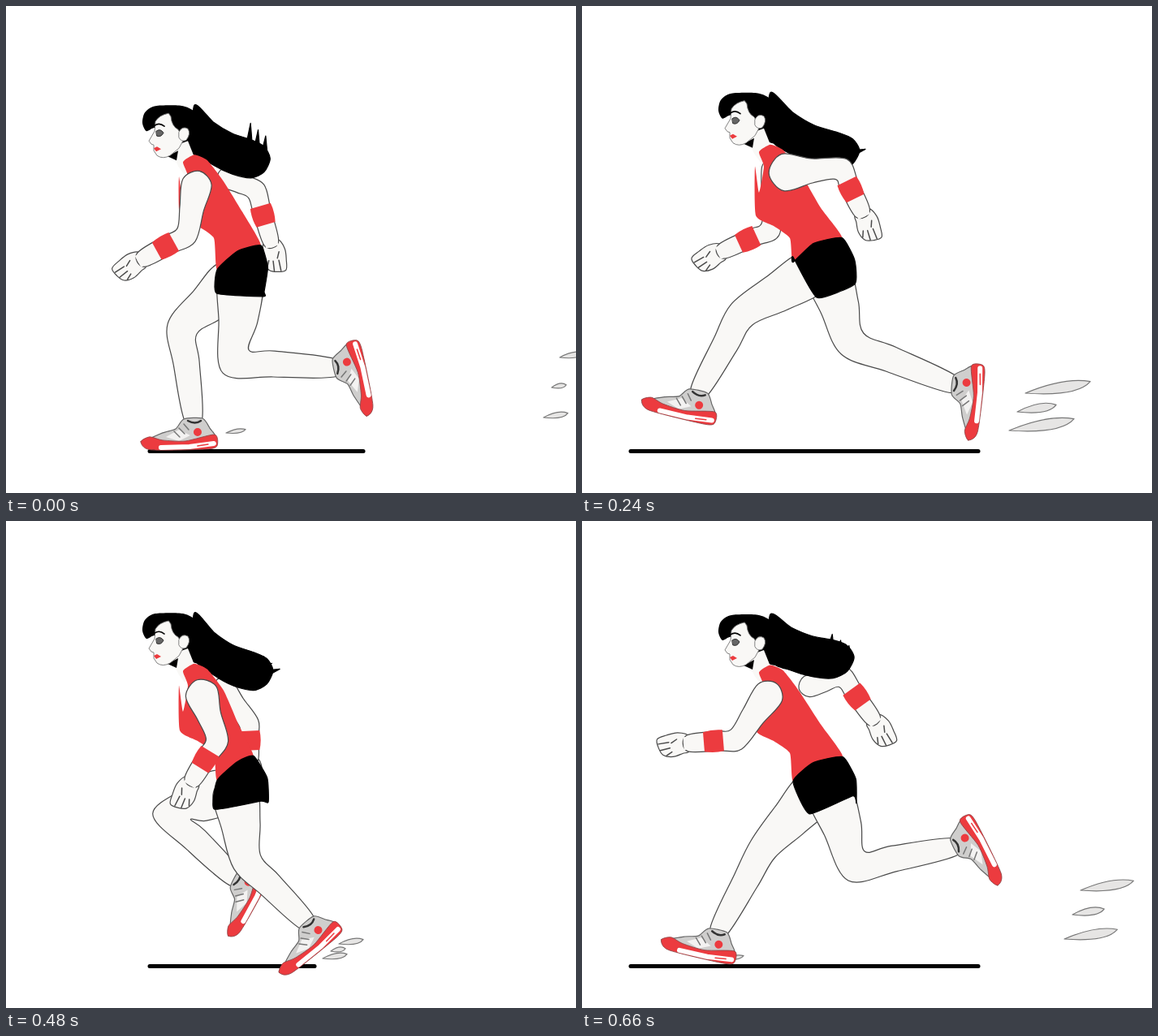
These frames come from a looping animation (702x600 px, 720 ms). An HTML page:

```html
<!DOCTYPE html>
<html lang="en">
<head>
<meta charset="utf-8">
<title>Runner</title>
<style>
html, body { margin: 0; width: 100%; height: 100%; overflow: hidden; background: #fff; }
svg { display: block; width: 702px; height: 600px; }
</style>
</head>
<body>
<svg id="stage" viewBox="0 0 702 600"></svg>
<script>
const SKIN = '#f9f8f6', RED = '#ec3b3f', INK = '#000', LINE = '#4a4a4a';
const STEP = 60, CYCLE = 12, HALF = 6;

// Key points of one stride: phase, then two joints. The far limb runs half a cycle later.
const legKeys = [ // knee, ankle
  [0, 283, 438, 407, 446], [2, 204, 364, 284, 442], [3, 198, 352, 231, 453],
  [4, 197, 380, 143, 477], [5, 223, 404, 167, 507], [6, 217, 398, 231, 511],
  [8, 297, 420, 372, 496], [9, 382, 423, 456, 484], [10, 333, 416, 459, 467],
  [11, 338, 425, 461, 401]];
const armKeys = [ // elbow, wrist
  [0, 222, 282, 166, 313], [2, 299, 249, 301, 296], [4, 319, 201, 346, 256],
  [5, 321, 192, 360, 246], [6, 308, 228, 327, 293], [8, 260, 270, 228, 322],
  [10, 232, 275, 171, 303], [11, 190, 269, 129, 274]];
const hairTips = [188, 186, 184, 211, 178, 168];

const mix = (a, b, t) => a + (b - a) * t;
const wave = (p, shift) => Math.cos((p - shift) * Math.PI / 3);
const deg = a => a * 180 / Math.PI;

function sample(keys, phase) {
  phase %= CYCLE;
  const i = keys.findLastIndex(k => k[0] <= phase);
  const a = keys[i], b = keys[(i + 1) % keys.length];
  const t = (phase - a[0]) / ((b[0] - a[0] + CYCLE) % CYCLE);
  return a.slice(1).map((v, j) => mix(v, b[j + 1], t));
}

const el = (d, fill, line = 'none', w = 1.2) =>
  `<path d="${d}" fill="${fill}" stroke="${line}" stroke-width="${w}" stroke-linejoin="round" stroke-linecap="round"/>`;
const group = (x, y, body, turn = 0, sy = 1) =>
  `<g transform="translate(${x} ${y}) rotate(${turn}) scale(1 ${sy})">${body}</g>`;
const parse = s => s.split(' ').map(p => p.split(',').map(Number));

// Closed curve through the points
function smooth(pts, k = 1 / 6) {
  const n = pts.length, at = i => pts[(i + n) % n];
  let d = 'M' + pts[0];
  for (let i = 0; i < n; i++) {
    const [a, b, c, e] = [at(i - 1), at(i), at(i + 1), at(i + 2)];
    d += 'C' + [b[0] + (c[0] - a[0]) * k, b[1] + (c[1] - a[1]) * k,
      c[0] - (e[0] - b[0]) * k, c[1] - (e[1] - b[1]) * k, ...c].map(v => v.toFixed(1)).join(' ');
  }
  return d + 'Z';
}

// Two tapered bones; widths run root, upper middle, joint, lower middle, end
function limb(ax, ay, bx, by, cx, cy, widths) {
  const u = Math.atan2(by - ay, bx - ax), v = Math.atan2(cy - by, cx - bx);
  const bend = Math.atan2(Math.sin(v - u), Math.cos(v - u));
  const miter = 1 / Math.sqrt(Math.max(0.4, Math.cos(bend / 2)));
  const rows = [
    [ax, ay, u, 1], [mix(ax, bx, .5), mix(ay, by, .5), u, 1], [bx, by, u + bend / 2, miter],
    [mix(bx, cx, .38), mix(by, cy, .38), v, 1], [cx, cy, v, 1]];
  const side = s => rows.map(([x, y, a, m], i) =>
    [x - Math.sin(a) * widths[i] * m * s, y + Math.cos(a) * widths[i] * m * s]);
  const cap = [ax - Math.cos(u) * widths[0] * .75, ay - Math.sin(u) * widths[0] * .75];
  return el(smooth([cap, ...side(1), ...side(-1).reverse()]), SKIN, LINE);
}

const hand = el(smooth(parse('-3,-9 10,-14 24,-12 36,-8 35,3 30,12 18,15 6,12 -3,9')), SKIN, LINE)
  + el('M35 -2L22 -3M33 6L21 4M26 13L19 9M12 -6L19 -2', 'none', LINE, 1.5);

const shoe = el(smooth(parse('-12,-2 11,-3 20,9 27,20 10,27 -40,30 -58,25 -38,15 -22,10'), .12), '#cfcecd', '#666')
  + el('M-34 20L-18 11L-4 18L-18 25Z', '#f3f2f1')
  + el('M-24 13L-17 20M-18 9L-11 16M-12 4L-6 11', 'none', '#777', 1.5)
  + el('M-7 0Q2 5 9 0', 'none', '#333', 2.5)
  + `<circle cx="5" cy="14" r="5" fill="${RED}"/>`
  + el(smooth(parse('-65,26 -54,20 -38,24 -10,25 26,17 29,31 15,35 -53,36'), .12), RED, '#8d4446', .8)
  + el('M-40 33L-5 32L25 28', 'none', '#fff', 6)
  + el('M5 31L18 29', 'none', RED, 1.5);

const head = el(smooth(parse('177,160 172,150 175,137 188,129 222,129 240,139 249,160 243,190 225,184 205,170 188,156'), .13), INK)
  + el('M206 180L228 172L238 197L224 214L216 203Z', SKIN)
  + el('M203 191L216 184L214 196Z', INK)
  + el('M204 138Q193 140 188 148L187 160L180 172L183 176L186 177L186 184L190 190Q197 195 206 190L217 181L223 170L216 158Q208 154 207 142Z', SKIN, '#777', .9)
  + el('M217 161Q221 153 228 157Q232 163 226 171Q220 174 217 168Z', SKIN, '#777', .9)
  + el('M187 153Q193 149 199 154', 'none', INK, 1.6)
  + el('M189 160Q194 156 198 162Q195 168 190 166Z', '#666', '#333', 1)
  + el('M186 181L190 179L195 182L189 185Z', RED);

function hair(p, bob) {
  const tip = hairTips[p], bendY = Math.min(tip + 10, 195);
  const thick = 22 - Math.max(0, tip - 188) * .55, reach = 332 - 10 * wave(p, .8);
  const spine = t => [mix(232, reach, t), mix(mix(156 + bob, bendY, t), mix(bendY, tip, t), t)];
  const edge = s => [0, .25, .5, .75, .92].map(t => {
    const [x, y] = spine(t);
    return [x, y + s * mix(28, thick, t) * (t > .9 ? .7 : 1)];
  });
  const [top, low] = [edge(-1), edge(1)];
  const lift = 26 * Math.max(0, wave(p, 0));
  let locks = '';
  for (let j = 0; j < 3; j++) {
    const [x, y] = spine(.72 + j * .1), up = y - thick * (.8 - j * .2);
    locks += `M${x - 5} ${up + 8}L${x + (lift ? 2 : 16)} ${up - lift + j * 3}L${x + 5} ${up + 12}Z`;
  }
  return el(smooth([...top, [reach, tip], ...low.reverse()], .13), INK, INK) + el(locks, INK, INK);
}

function arm(phase, bob, near) {
  const [bx, by, cx, cy] = sample(armKeys, phase);
  const ax = near ? 236 + (bx - 226) * .12 : 215 + (bx - 190) * .47;
  const ay = (near ? 221 : 214) + bob * .75;
  const a = deg(Math.atan2(cy - by, cx - bx));
  const widths = near ? [18 + Math.max(0, bx - 226) * .05, 15, 13, 12, 9.5] : [13, 12, 12, 11, 9];
  return group(cx, cy, hand, a, cx < bx ? -1 : 1) + limb(ax, ay, bx, by, cx, cy, widths)
    + group(cx, cy, el('M-6 -8L4 -8L4 8L-6 8Z', SKIN), a)
    + group(mix(bx, cx, .46), mix(by, cy, .46), el('M-12 -13Q0 -15 12 -12L12 12Q0 15 -12 13Z', RED), a);
}

function leg(phase, hip) {
  const [kx, ky, x, y] = sample(legKeys, phase);
  const flat = 30 * Math.max(0, Math.cos((phase % CYCLE - 7) * Math.PI / 4)) * (Math.abs(phase % CYCLE - 7) < 2);
  const turn = flat - 14 - deg(Math.atan2(x - kx, y - ky));
  return limb(hip[0] + (kx - 290) * .14, hip[1] + 6, kx, ky, x, y, [27, 24, 18, 16, 10.5])
    + group(x, y, shoe, turn);
}

function clothes(phase, bob, [bx, by], hip) {
  const near = sample(legKeys, phase), far = sample(legKeys, phase + HALF);
  const top = parse('213,206 218,238 224,206 218,188 232,179 248,186 268,212').map(([x, y]) => [x, y + (bob + 11) * .8]);
  const waist = [[260, by + 30], [285, by + 7], [bx, by]];
  const shirt = [...top, [mix(268, bx, .5), mix(212, by, .5)], ...waist.slice().reverse(), ...parse('256,286 236,271 214,258')];
  // The hem lies across the near thigh
  const u = Math.atan2(near[1] - hip[1], near[0] - hip[0]);
  const hem = s => [hip[0] + 25 * Math.cos(u) - s * 29 * Math.sin(u), hip[1] + 25 * Math.sin(u) + s * 29 * Math.cos(u)];
  const rear = 318 + (Math.max(near[0], far[0]) - 283) * .36;
  const shorts = [...waist, [mix(bx, rear, .6) + 6, by + 27], [rear, by + 57], hem(-1), hem(1)];
  return el(smooth(shirt, .09), RED) + el(smooth(shorts, .08), INK, INK);
}

function puff(x, y, len, w) {
  return el(`M${x} ${y}Q${x + len * .6} ${y - len * .14 - w} ${x + len} ${y - len * .18}Q${x + len * .8} ${y + w * .5} ${x} ${y}Z`, '#e6e5e4', '#777');
}

// Streaks leave the pushing foot and drift back; small ones rise behind the landing foot
function dust(p, phase) {
  const age = (p + 4) % HALF, len = 30 + 50 * Math.max(0, Math.sin(age * Math.PI / 4));
  let out = '';
  for (let j = -1; j < 2; j++) {
    out += puff(400 + 68 * age - j * 10, 530 - 15 * age + j * (9 + 7 * age), len * (j ? 1 : .6), 4 + len * .06);
  }
  if (p === 5 || p === 0) {
    const x = Math.min(sample(legKeys, phase)[2], sample(legKeys, phase + HALF)[2]);
    out += puff(x + (p ? 8 : 40), p ? 540 : 526, 24, 4);
  }
  return out;
}

function draw(phase) {
  const p = phase % HALF;
  const bob = -14 + 9 * wave(p, .4);
  const back = [313 + 9 * wave(p, 4.6), 290 + (bob + 14) * .6];
  const hip = [back[0] - 24, back[1] + 36];
  const ground = p < 3 ? [177, 440 - 30 * p] : [p < 4 ? 182 : 60, 488];
  return el(`M${ground[0]} 548.5H${ground[1]}`, 'none', INK, 5)
    + dust(p, phase)
    + arm(phase + HALF, bob, false)
    + hair(p, bob)
    + leg(phase + HALF, hip) + leg(phase, hip)
    + group(-4, bob, head)
    + clothes(phase, bob, back, hip)
    + arm(phase, bob, true);
}

const stage = document.getElementById('stage');
const start = performance.now();
let shown = -1;

function tick() {
  const phase = Math.floor((performance.now() - start) / STEP) % CYCLE;
  if (phase !== shown) stage.innerHTML = draw(shown = phase);
  requestAnimationFrame(tick);
}
tick();
</script>
</body>
</html>
```
